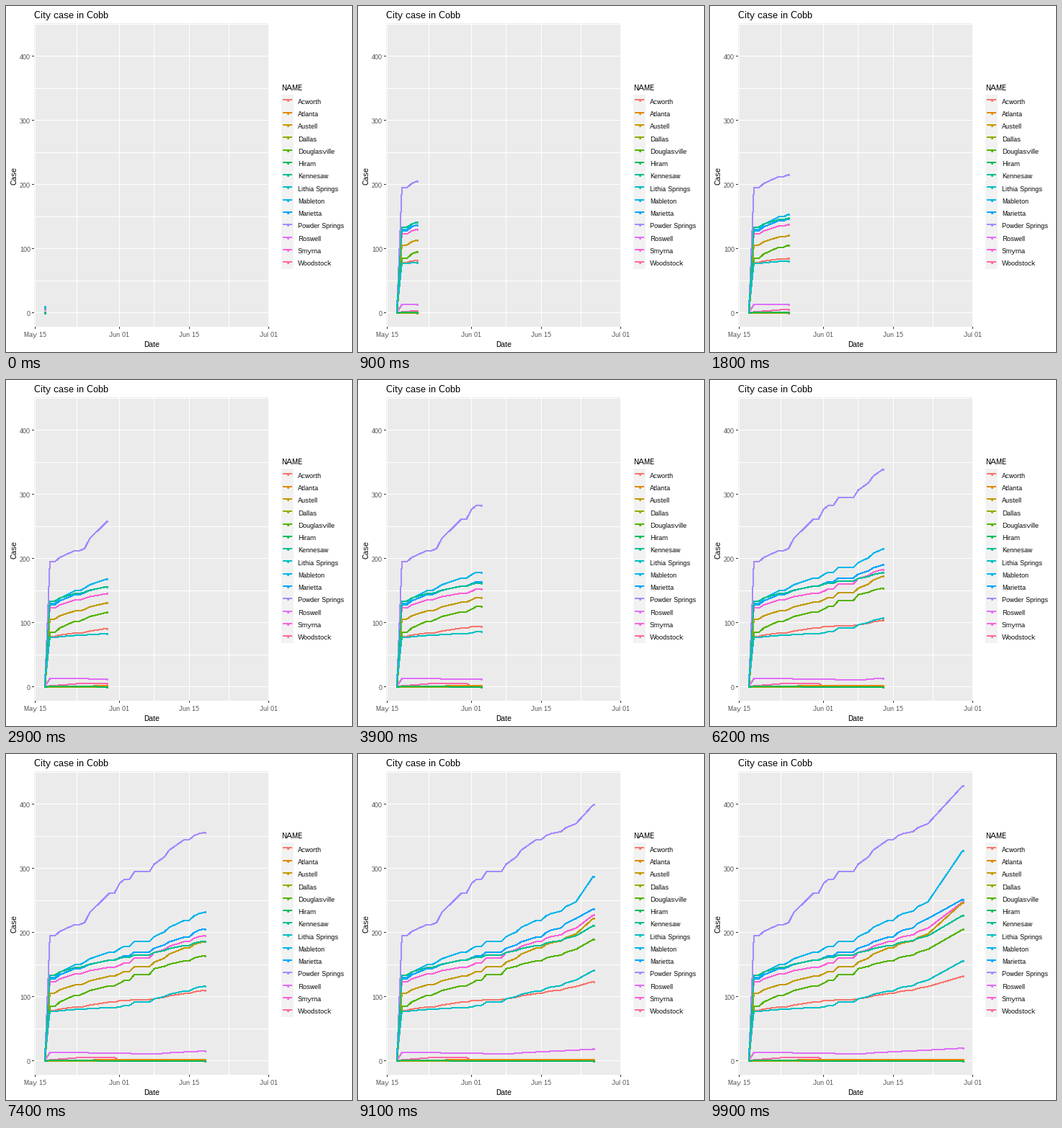
A matplotlib script that plays this animation: 480 px wide and 480 px high, repeating every 10 s.

```python
import matplotlib.pyplot as plt
import numpy as np
from matplotlib.animation import FuncAnimation
from matplotlib.patches import Rectangle

SIZE, DPI = 480, 72          # at 72 dpi one point is one pixel
FRAMES, INTERVAL = 100, 100
LAST_DAY = 43                # days counted from May 17

plt.rcParams.update({
    "font.family": "Liberation Sans",
    "text.hinting": "native",
    "text.hinting_factor": 1,
})

# Reporting days; two dates have no report
days = np.array([d for d in range(LAST_DAY + 1) if d not in (5, 32)])
key_frames = np.round((FRAMES - 1) * days / LAST_DAY)

# All cities share a reporting rhythm: quiet days stay flat, busy days jump
pace = np.ones(LAST_DAY)
pace[[1, 6, 13, 16, 18, 19, 20, 28, 31]] = 0
pace[[2, 8, 14, 17, 21, 24, 29, 33]] = 2
clock = np.append(0, np.cumsum(pace))
weeks = np.append(0, np.arange(1, LAST_DAY + 1, 7))


def weekly(*readings, start=1):
    """Fill in the days between weekly readings along the shared clock."""
    return np.interp(clock[days], clock[weeks], (start, *readings))


def steady(at, cases):
    return np.interp(days, at, cases)


cities = [
    ("Acworth", "#F8766D", weekly(79, 85, 94, 97, 105, 116, 132)),
    ("Atlanta", "#E38900", steady([9, 10], [0, 2])),
    ("Austell", "#C49A00", weekly(106, 121, 136, 154, 176, 198, 247)),
    ("Dallas", "#99A800", steady([0], [0])),
    ("Douglasville", "#53B400", weekly(85, 106, 121, 144, 156, 174, 205)),
    ("Hiram", "#00BC56", steady([0, 1, 10, 11], [0, 1, 1, 0])),
    ("Kennesaw", "#00C094", weekly(134, 148, 160, 169, 180, 195, 227)),
    ("Lithia Springs", "#00BFC4",
     weekly(77, 81, 84, 97, 109, 126, 156, start=8)),
    ("Mableton", "#00B6EB",
     weekly(130, 154, 175, 194, 219, 248, 328, start=10)),
    ("Marietta", "#06A4FF", weekly(128, 147, 161, 176, 193, 222, 252)),
    ("Powder Springs", "#A58AFF", weekly(195, 216, 277, 307, 345, 370, 429)),
    ("Roswell", "#DF70F8", weekly(13, 13, 12, 11, 14, 17, 20)),
    ("Smyrna", "#FB61D7", weekly(123, 138, 149, 169, 186, 207, 248, start=5)),
    ("Woodstock", "#FF66A8", steady([0, 8, 14, 15], [1, 6, 6, 0])),
]


def px(day):
    return 53.95 + 6.9 * day


def py(value):
    return 425.9 - 0.89 * value


fig = plt.figure(figsize=(SIZE / DPI, SIZE / DPI), dpi=DPI, facecolor="white")
ax = fig.add_axes([0, 0, 1, 1])
ax.set(xlim=(0, SIZE), ylim=(SIZE, 0))
ax.axis("off")


def box(x, y, w, h, color):
    ax.add_patch(Rectangle((x, y), w, h, color=color, lw=0, zorder=1))


def vline(x, top, bottom, color):
    box(np.floor(x), top, 1, bottom - top, color)


def hline(y, left, right, color):
    box(left, np.floor(y), right - left, 1, color)


def label(x, y, text, size, color="black", **kw):
    ax.text(x, y, text, fontsize=size, color=color, **kw)


def stroke(color, zorder):
    # Without antialiasing every touched pixel fills, so 1 shows as about 2
    return ax.plot([], [], color=color, lw=1, solid_capstyle="butt",
                   antialiased=False, snap=False, zorder=zorder)[0]


def dot(color, zorder, xs=(), ys=()):
    return ax.plot(xs, ys, "o", color=color, ms=3.1, mew=0,
                   antialiased=False, zorder=zorder)[0]


# Panel, grid and axes
LEFT, TOP, RIGHT, BOTTOM = 39, 24, 364, 445
GRAY, TICK = "#4D4D4D", "#333333"
box(LEFT, TOP, RIGHT - LEFT, BOTTOM - TOP, "#EBEBEB")

dates = {"May 15": -2, "Jun 01": 15, "Jun 15": 29, "Jul 01": 45}
marks = list(dates.values())
for day in marks + [(a + b) / 2 for a, b in zip(marks, marks[1:])]:
    vline(px(day), TOP, BOTTOM, "white")
for value in range(0, 451, 50):
    hline(py(value), LEFT, RIGHT, "white")

for text, day in dates.items():
    vline(px(day), BOTTOM, BOTTOM + 3, TICK)
    label(px(day), 459, text, 9, GRAY, ha="center")
for value in range(0, 401, 100):
    hline(py(value), LEFT - 3, LEFT, TICK)
    label(34, py(value) + 4.1, str(value), 9, GRAY, ha="right")

label(39, 17, "City case in Cobb", 13)
label(202, 473, "Date", 11, ha="center")
label(11.5, 236, "Case", 11, rotation=90, ha="center", va="center")

# Legend
KEY = 17.28
label(382, 117, "NAME", 11)
box(382, 122.9, KEY, KEY * len(cities), "#F2F2F2")
for i, (name, color, _) in enumerate(cities):
    y = np.floor(130.95 + KEY * i)
    box(384, y - 1, 13, 2, color)
    dot(color, 3, [390.5], [y + 0.5])
    label(405, 135.7 + KEY * i, name, 9)

# Drawing order starts at Mableton and wraps round
lines, dots = [], []
for i, (_, color, _) in enumerate(cities):
    rank = (i - 8) % len(cities)
    lines.append(stroke(color, 10 + rank))
    dots.append(dot(color, 30 + rank))


def update(frame):
    now = np.interp(frame, key_frames, days)
    past = days < now
    xs = px(np.append(days[past], now))
    for (_, _, cases), line, head in zip(cities, lines, dots):
        ys = py(np.append(cases[past], np.interp(now, days, cases)))
        line.set_data(xs, ys)
        head.set_data(xs[-1:], ys[-1:])
    return lines + dots


anim = FuncAnimation(fig, update, frames=FRAMES, interval=INTERVAL,
                     repeat=True, repeat_delay=0)
plt.show()
```
